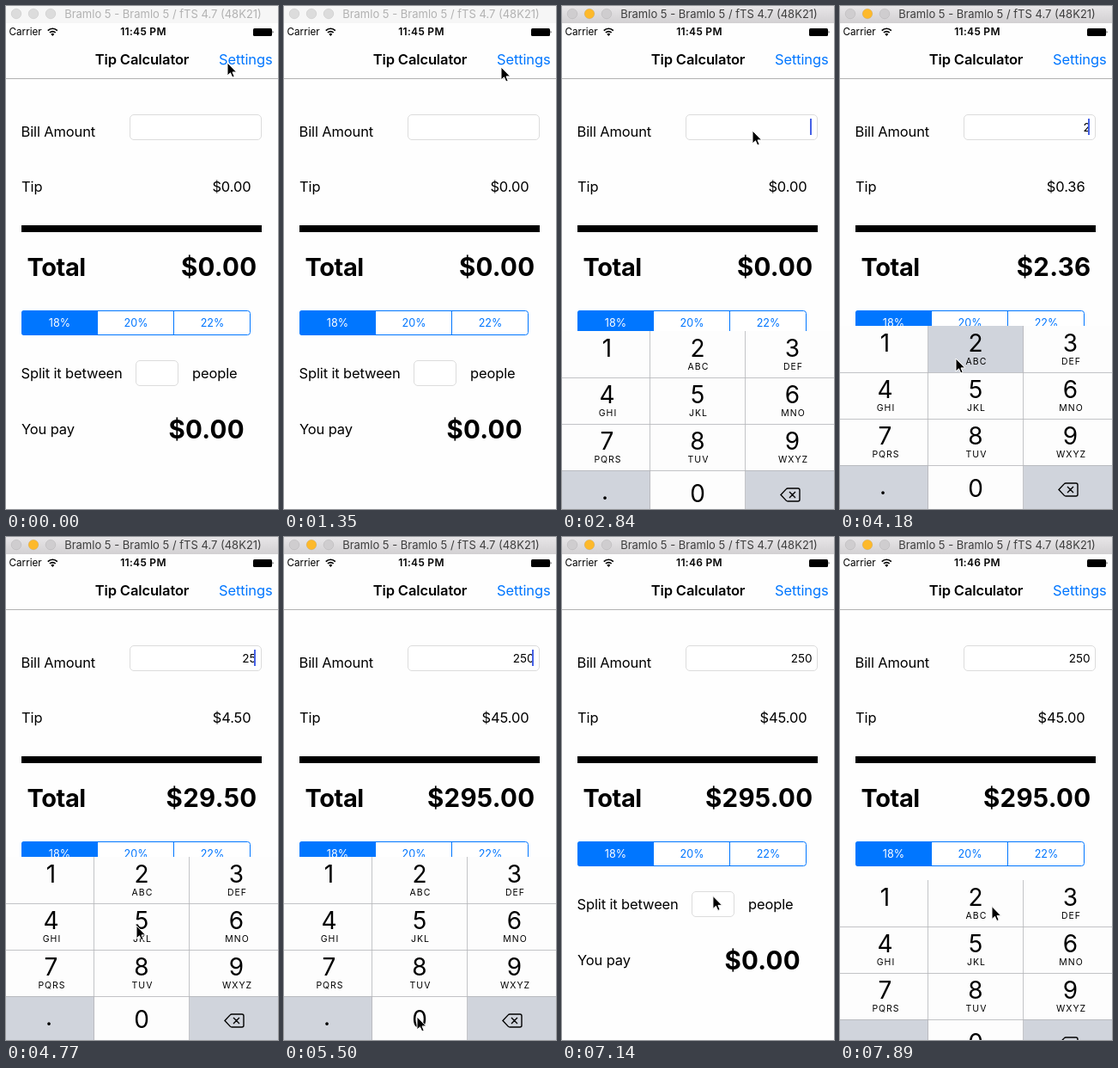
An HTML page for the animation above (8000 ms loop, 317 by 585 pixels).

```html
<!DOCTYPE html>
<html lang="en">
<head>
<meta charset="utf-8">
<title>Tip Calculator</title>
<style>
  html, body { margin: 0; width: 100%; height: 100%; overflow: hidden; background: #fefefe; }
  svg { display: block; width: 317px; height: 585px; }
  text { font: 16.5px Inter, sans-serif; letter-spacing: -.13px; white-space: pre; }
  .bold { font-weight: 600; }
  .big { font-size: 29.5px; font-weight: 700; letter-spacing: .3px; }
  .head { font-size: 29px; font-weight: 700; letter-spacing: -.4px; }
  .window { font-size: 13px; letter-spacing: 0; }
  .status { font-size: 11.7px; letter-spacing: 0; }
  .clock { font-size: 12px; font-weight: 600; letter-spacing: .3px; }
  .segment { font-size: 12.6px; letter-spacing: 0; }
  .entry { font-size: 13.6px; letter-spacing: 0; }
  .digit { font-size: 28px; letter-spacing: 0; }
  .letters { font-size: 10.5px; letter-spacing: 1px; }
  .mid { text-anchor: middle; }
  .end { text-anchor: end; }
  .blue { fill: #0076ff; }
  .field { fill: #fff; stroke: #dcdcdc; }
  .caret { fill: #4561e6; }
</style>
</head>
<body>
<svg id="stage" viewBox="0 0 317 585">
  <defs>
    <linearGradient id="chrome" x2="0" y2="1">
      <stop stop-color="#e8e6e8"/><stop offset="1" stop-color="#d2d0d2"/>
    </linearGradient>
  </defs>
  <rect width="317" height="585" fill="#fefefe"/>
  <rect id="bar" width="317" height="20"/>
  <g id="lights" stroke="#000" stroke-opacity=".1" stroke-width=".8">
    <circle cx="12" cy="9" r="5.8"/><circle id="amber" cx="32" cy="9" r="5.8"/><circle cx="52" cy="9" r="5.8"/>
  </g>
  <text id="caption" class="window mid" x="183" y="14">Bramlo 5 - Bramlo 5 / fTS 4.7 (48K21)</text>

  <text class="status" x="3.5" y="34">Carrier</text>
  <g fill="none" stroke="#000" stroke-width="1.7">
    <path d="M48.8 28.6a7.6 7.6 0 0 1 11 0M50.9 31a4.8 4.8 0 0 1 6.8 0"/>
  </g>
  <path d="M54.3 35l-2-2.2a2.9 2.9 0 0 1 4 0z"/>
  <text id="clock" class="clock mid" x="160" y="34"></text>
  <rect x="288" y="26" width="22" height="9" rx="1.5"/>
  <path d="M310.7 28.5q1.8 1.8 0 3.6z"/>
  <text class="bold mid" x="158.5" y="68">Tip Calculator</text>
  <text class="blue end" x="310.5" y="68">Settings</text>
  <rect y="84" width="317" height="1" fill="#b2b2b2"/>

  <text x="17.5" y="151.5">Bill Amount</text>
  <rect class="field" x="144.5" y="126.5" width="153" height="29" rx="4.5"/>
  <text id="bill" class="entry end" x="291.7" y="146"></text>
  <rect id="caret" class="caret" x="289" y="131" width="2" height="19"/>
  <text x="18" y="216">Tip</text>
  <text id="tip" class="end" x="285.5" y="216"></text>
  <rect x="18" y="255" width="280" height="8"/>
  <text class="head" x="24.5" y="314">Total</text>
  <text id="total" class="big end" x="292.5" y="314"></text>

  <rect x="18.5" y="354.5" width="266" height="28" rx="3" fill="#fff" stroke="#0076ff"/>
  <path class="blue" d="M107 354H21a3 3 0 0 0-3 3v23a3 3 0 0 0 3 3h86zM195 354h1v29h-1z"/>
  <text class="segment mid" x="62.5" y="373" fill="#fff">18%</text>
  <text class="segment mid blue" x="151.5" y="373">20%</text>
  <text class="segment mid blue" x="240.5" y="373">22%</text>

  <text x="17.5" y="432.5">Split it between</text>
  <rect class="field" x="151.5" y="412.5" width="49" height="29" rx="4.5"/>
  <rect id="splitCaret" class="caret" x="192" y="417" width="2" height="19"/>
  <text x="217" y="432.5">people</text>
  <text x="18" y="497.5">You pay</text>
  <text class="big end" x="278" y="502.5">$0.00</text>

  <g id="keypad"></g>
  <path id="pointer" d="M0 0V15l3.5-3.2 2.3 5.2 2.4-1-2.2-5.1h4.7z" stroke="#fff"/>
</svg>
<script>
const $ = id => document.getElementById(id);
const LOOP = 8000, TICK = 148.9, KEY_H = 54, SHOWN = 372, HIDDEN = 585;
const GRAY = '#d0d4dc', KEY = '#fdfdfd';
const edges = [0, 103, 214, 317], centers = [52.5, 158, 268.5];
const labels = ['1', '2ABC', '3DEF', '4GHI', '5JKL', '6MNO', '7PQRS', '8TUV', '9WXYZ', '.', '0', ''];

$('keypad').innerHTML = labels.map((label, i) => {
  const col = i % 3, y = Math.floor(i / 3) * KEY_H, x = centers[col];
  const base = y + (label === '0' ? 37 : label === '.' ? 34 : 30);
  return `<rect id="key${i}" x="${edges[col]}" y="${y}" width="${edges[col + 1] - edges[col]}" height="${KEY_H}"
      fill="${label === '.' || !label ? GRAY : KEY}"/>
    <text class="digit mid" x="${label === '.' ? 50 : x}" y="${base}">${label.slice(0, 1)}</text>
    <text class="letters mid" x="${x + 1}" y="${y + 45}">${label.slice(1)}</text>`;
}).join('') + `
  <path d="M0 54.5H317M0 108.5H317M0 162.5H317M102.5 0V216M213.5 0V216" stroke="#b4b5b9" stroke-width=".8"/>
  <path d="M255 190.5l6.2-6.6q.8-.9 2-.9H275q2 0 2 2v11q0 2-2 2h-11.8q-1.2 0-2-.9zM265 187l7 7M272 187l-7 7"
    fill="none" stroke="#000" stroke-width="1.4"/>`;

// Pointer stops: tick, x, y
const stops = [
  [1, 258, 66], [4, 212, 82], [8, 252, 66], [9, 253, 71], [11, 203, 289], [12, 203, 289],
  [17, 222, 145], [20, 222, 145], [28, 135, 410], [31, 152, 452], [32, 152, 452], [36, 155, 558],
  [37, 155, 558], [41, 150, 248], [43, 150, 248], [49, 178, 431], [50, 177, 429.5]
];

function pointerAt(n) {
  const i = stops.findIndex(s => s[0] >= n);
  if (i < 0) return stops[stops.length - 1].slice(1);
  if (i === 0) return stops[0].slice(1);
  const a = stops[i - 1], b = stops[i], p = (n - a[0]) / (b[0] - a[0]), e = p * p * (3 - 2 * p);
  return [1, 2].map(k => a[k] + (b[k] - a[k]) * e);
}

// Critically damped spring falling from 1 to 0
function spring(ticks) {
  const x = 2.68 * Math.max(0, ticks);
  return (1 + x) * Math.exp(-x);
}

function keypadTop(n) {
  const travel = HIDDEN - SHOWN;
  if (n < 42) return SHOWN + travel * spring(n - 17);
  if (n < 51) return HIDDEN - travel * spring(n - 42.765);
  return SHOWN + travel * spring(n - 51.66);
}

const between = (n, from, to) => n >= from && n < to;
const show = (id, on) => $(id).setAttribute('visibility', on ? 'visible' : 'hidden');
const fill = (id, color) => $(id).setAttribute('fill', color);

function draw(now) {
  const n = Math.floor((now % LOOP) / TICK + .1);
  const active = n >= 17;
  fill('bar', active ? 'url(#chrome)' : '#f6f6f6');
  fill('lights', active ? '#cfcdcf' : '#dcdcdc');
  fill('amber', active ? '#fdb92b' : '#dcdcdc');
  fill('caption', active ? '#3e3e3e' : '#b2b2b2');
  $('clock').textContent = n < 47 ? '11:45 PM' : '11:46 PM';

  const bill = n < 28 ? '' : n < 31 ? '2' : n < 36 ? '25' : '250';
  $('bill').textContent = bill;
  $('tip').textContent = '$' + (bill * .18).toFixed(2);
  $('total').textContent = '$' + (bill * 1.18).toFixed(2);
  show('caret', between(n, 17, 43) && !between(n, 22, 25) && !between(n, 40, 43));
  show('splitCaret', n >= 52);

  fill('key1', n === 28 ? GRAY : KEY);
  fill('key4', n === 31 ? GRAY : KEY);
  fill('key10', n === 36 ? GRAY : KEY);
  $('keypad').setAttribute('transform', `translate(0 ${Math.round(keypadTop(n))})`);
  $('pointer').setAttribute('transform', `translate(${pointerAt(n)})`);
  requestAnimationFrame(() => draw(performance.now() - start));
}

const start = performance.now();
draw(0);
</script>
</body>
</html>
```
